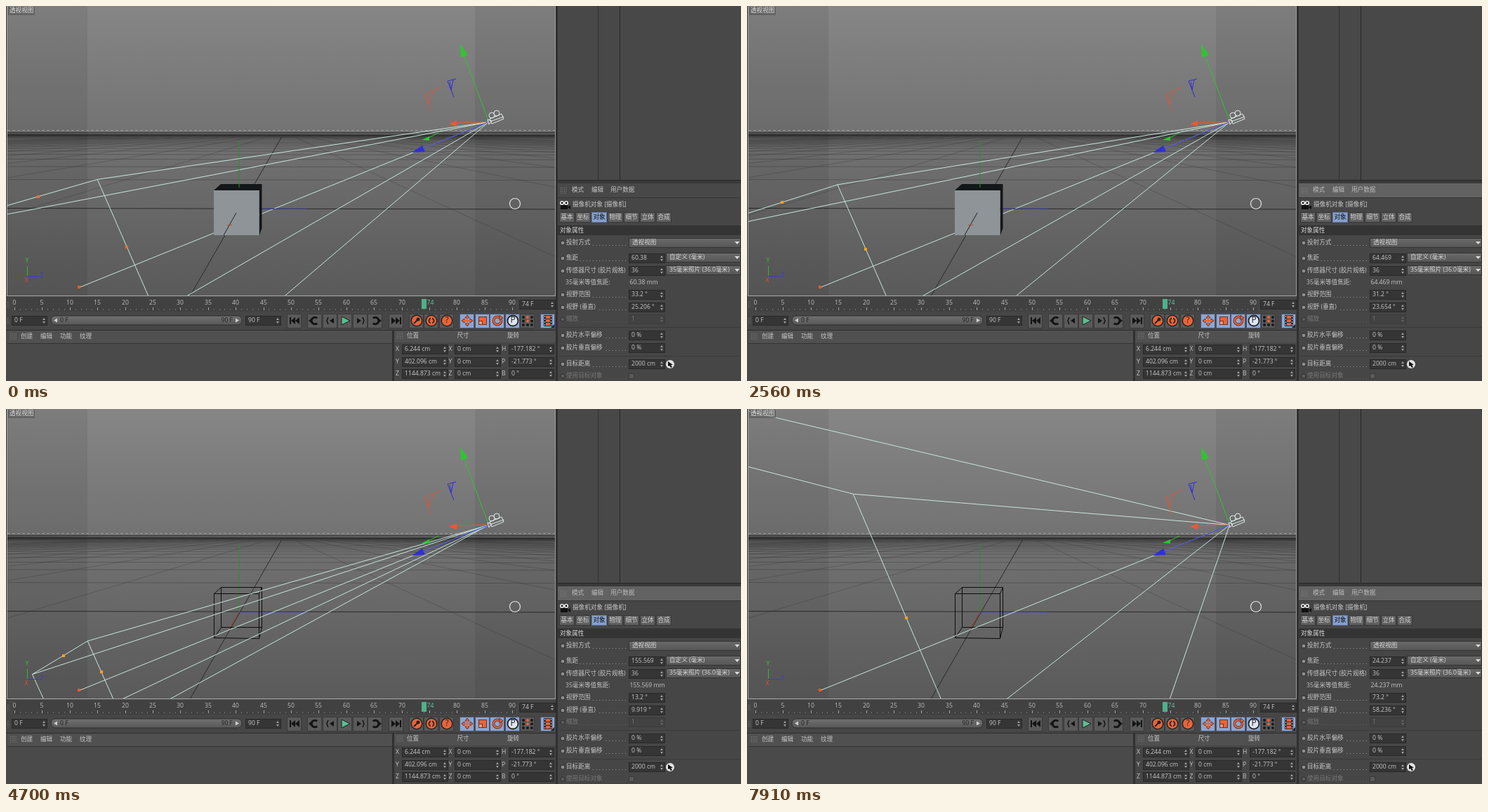
An HTML page with a canvas for the animation above (8 s loop, 1047x535 px).

```html
<!DOCTYPE html>
<html lang="zh">
<head>
<meta charset="utf-8">
<style>
html, body { margin: 0; width: 100%; height: 100%; overflow: hidden; background: #464646; }
canvas { display: block; }
</style>
</head>
<body>
<canvas id="stage" width="1047" height="535"></canvas>
<script>
const LOOP = 8000;
const FONT = '"Open Sans", "Noto Sans CJK SC", "Noto Sans CJK", sans-serif';
const screen2d = document.getElementById('stage').getContext('2d');
let g = screen2d;

// [start ms, value]
const VIEW = [[0, 33.2], [2080, 32.2], [2560, 31.2], [4130, 11.2], [4700, 13.2], [6120, 25.2], [6650, 43.2], [7910, 73.2]];
const LENS = [[0, 33.2], [2080, 32.2], [2560, 31.2], [3560, 11.2], [4700, 13.2], [5760, 25.2], [6370, 43.2], [7670, 73.2]];
const ANGLE = [...LENS.slice(0, 7), [7240, 58.2], LENS[7]];
const CURSOR = [[0, null], [230, [959, 437]], [570, [948, 423]], [790, [932, 417]], [1050, [931, 414]],
  [1280, [931, 410]], [1490, [931, 409]], [1780, [932, 408]], [2080, null]];

const at = (steps, t) => steps.filter(s => s[0] <= t).pop()[1];

function box(x, y, w, h, fill, edge) {
  g.fillStyle = fill;
  g.fillRect(x, y, w, h);
  if (edge) {
    g.strokeStyle = edge;
    g.lineWidth = 1;
    g.strokeRect(x + .5, y + .5, w - 1, h - 1);
  }
}
function trace(p) {
  g.beginPath();
  for (let i = 0; i < p.length; i += 2) g.lineTo(p[i], p[i + 1]);
}
function line(color, p, width = 1) {
  trace(p);
  g.strokeStyle = color;
  g.lineWidth = width;
  g.stroke();
}
function poly(color, p, edge) {
  trace(p);
  g.closePath();
  g.fillStyle = color;
  g.fill();
  if (edge) {
    g.strokeStyle = edge;
    g.lineWidth = 1;
    g.stroke();
  }
}
function ring(x, y, r, color, width = 1, from = 0, to = 7) {
  g.beginPath();
  g.arc(x, y, r, from, to);
  g.strokeStyle = color;
  g.lineWidth = width;
  g.stroke();
}
function disc(x, y, r, color) {
  g.beginPath();
  g.arc(x, y, r, 0, 7);
  g.fillStyle = color;
  g.fill();
}
function text(s, x, y, color = '#c6c6c6', align = 'left', size = 8.6) {
  g.font = size + 'px ' + FONT;
  g.textBaseline = 'middle';
  g.textAlign = align;
  g.fillStyle = color;
  g.fillText(s, x, y);
}
function shade(y0, y1, a, b) {
  const s = g.createLinearGradient(0, y0, 0, y1);
  s.addColorStop(0, a);
  s.addColorStop(1, b);
  return s;
}
function spinner(x, y, color = '#a0a0a0') {
  poly(color, [x - 2, y - 1, x + 2, y - 1, x, y - 4]);
  poly(color, [x - 2, y + 1, x + 2, y + 1, x, y + 4]);
}
function field(x, y, w, s, off) {
  box(x, y - 7, w, 14, off ? '#424242' : '#353535', off ? '#3b3b3b' : '#292929');
  if (s) text(s, x + 4, y, off ? '#777' : '#c6c6c6');
  spinner(x + w - 5, y, off ? '#666' : undefined);
}
function dropdown(x, y, s) {
  box(x, y - 7, 1047 - x, 14, shade(y - 7, y + 7, '#6b6b6b', '#555'), '#333');
  text(s, x + 5, y, '#d8d8d8');
  poly('#ddd', [1038, y - 2, 1045, y - 2, 1041.5, y + 2]);
}
function grip(x, y) {
  for (let i = 0; i < 4; i++) for (let j = 0; j < 4; j++) box(x + i * 2.5, y + j * 2.5, 1, 1, '#858585');
}

function floor() {
  box(0, 0, 784, 414, '#333');
  box(2, 0, 780, 413, shade(0, 413, '#868686', '#5a5a5a'));
  g.save();
  g.beginPath();
  g.rect(2, 0, 780, 413);
  g.clip();
  for (let n = 1; n < 50; n++) {
    const y = 180 + 109 / (1 + .6 * n);
    line(`rgba(40,40,40,${n < 12 ? .4 : .25})`, [2, y - .5, 782, y + .5], .8);
  }
  for (let n = -12; n <= 12; n++) {
    const k = (300 * n - 63) / 109;
    if (n) line('rgba(45,45,45,.35)', [396 + k * 8, 188, 396 + k * 233, 413], .8);
  }
  box(2, 180, 780, 8, shade(180, 188, 'rgba(40,40,40,.4)', 'rgba(50,50,50,0)'));
  box(2, 180, 780, 1, '#3a3a3a');
  line('#2b2b2b', [2, 288.5, 782, 290]);
  line('#2b2b2b', [392.5, 187, 262.5, 413]);
  box(2, 0, 114, 413, 'rgba(0,0,0,.07)');
  box(668, 0, 114, 413, 'rgba(0,0,0,.07)');
  g.setLineDash([4, 3]);
  line('#9a9a9a', [2, 177.5, 782, 177.5]);
  g.setLineDash([]);
  g.restore();
}

function transportIcon(i, x) {
  const y = 449, k = '#141414';
  if (i === 0 || i === 6) {
    const d = i ? 1 : -1;
    box(x + 6 * d - 1, y - 5, 2, 10, k);
    for (const o of [5, -1]) poly(k, [x + o * d, y, x + (o - 6) * d, y - 5, x + (o - 6) * d, y + 5]);
  } else if (i === 1 || i === 5) {
    // thick open arc with a pointed tip
    const d = i === 1 ? 1 : -1, mid = i === 1 ? Math.PI : 0;
    ring(x, y, 4.8, k, 3, mid - 2.3, mid + 2.3);
    poly(k, [x - 9 * d, y, x - 4 * d, y - 4, x - 4 * d, y + 4]);
  } else if (i === 2 || i === 4) {
    const d = i === 2 ? -1 : 1;
    poly(k, [x + d, y, x - 5 * d, y - 4, x - 5 * d, y + 4]);
    line(k, [x + 3 * d, y - 5, x + 5 * d, y, x + 3 * d, y + 5], 1.5);
  } else poly('#5fbd91', [x - 5, y - 6, x + 7, y, x - 5, y + 6], '#1d1d1d');
}

function toolIcon(i, x) {
  const y = 449, red = '#e8643a', k = '#222';
  if (i < 3) {
    disc(x, y, 8.5, k);
    disc(x, y, 7, red);
    if (i === 0) { line(k, [x - 4, y + 4, x + 2, y - 2], 2); disc(x + 2, y - 2, 2.5, k); }
    if (i === 1) { ring(x, y, 3.5, k, 1.8); box(x - 1, y - 5, 2, 10, red); }
    if (i === 2) text('?', x, y, k, 'center', 12);
  } else if (i === 3) {
    for (const [a, b] of [[1, 0], [-1, 0], [0, 1], [0, -1]])
      poly(red, [x + a * 8, y + b * 8, x + a * 4 + b * 3, y + b * 4 + a * 3, x + a * 4 - b * 3, y + b * 4 - a * 3], '#6b3425');
    line(red, [x - 5, y, x + 5, y], 2);
    line(red, [x, y - 5, x, y + 5], 2);
  } else if (i === 4) {
    box(x - 6, y - 6, 12, 12, red, '#6b3425');
    box(x - 6, y, 6, 6, '#f09a78', '#6b3425');
  } else if (i === 5) {
    ring(x, y, 5.5, '#6b3425', 3.8);
    ring(x, y, 5.5, red, 2);
    poly(red, [x + 3, y - 8, x + 8, y - 4, x + 3, y - 1], '#6b3425');
  } else if (i === 6) {
    disc(x, y, 7.5, '#dfe6f1');
    ring(x, y, 7.5, k, 1.8);
    text('P', x, y, k, 'center', 12);
  } else if (i === 7) {
    for (let n = 0; n < 9; n++) disc(x - 6 + n % 3 * 6, y - 5 + (n / 3 | 0) * 5.5, 2, n === 4 || n === 1 ? red : '#191919');
  } else {
    box(x - 6, y - 8, 12, 16, '#2a2a2a');
    for (let n = 0; n < 3; n++) box(x - 3, y - 7 + n * 5, 6, 4, red);
    for (let n = 0; n < 4; n++) { box(x - 5, y - 7 + n * 4, 1, 2, '#ccc'); box(x + 4, y - 7 + n * 4, 1, 2, '#ccc'); }
    poly(k, [x + 9, y + 10, x + 9, y + 5, x + 4, y + 10]);
  }
}

function timeline() {
  box(0, 414, 784, 48, '#464646');
  box(8, 416, 719, 20, '#414141');
  grip(2, 422);
  grip(2, 445);
  box(5, 416, 6, 45, '#464646');
  for (let n = 0; n <= 90; n++) {
    const x = Math.round(12 + n * 7.88), big = n % 5 === 0;
    box(x, big ? 430 : 432, 1, big ? 4 : 2, big ? '#a5a5a5' : '#707070');
    if (big && n !== 75) text(n, x, 423.5, '#bdbdbd', 'center');
  }
  box(592, 418, 7, 14, '#4fb08b');
  text('74', 599.5, 423.5, '#62c49c');
  field(731, 426, 52, '74 F');
  field(8, 449, 51, '0 F');
  field(341, 449, 51, '90 F');
  g.beginPath();
  g.roundRect(64, 442, 272, 13, 6);
  g.fillStyle = shade(442, 455, '#707070', '#585858');
  g.fill();
  g.strokeStyle = '#2d2d2d';
  g.stroke();
  poly('#d0d0d0', [68, 448.5, 73, 445.5, 73, 451.5]);
  poly('#d0d0d0', [332, 448.5, 327, 445.5, 327, 451.5]);
  text('0 F', 77, 448.5, '#222');
  text('90 F', 323, 448.5, '#222', 'right');
  [411, 440, 462, 483, 505, 526, 556].forEach((x, i) => {
    box(x - 11, 439, 21, 21, '#5a5a5a', '#3a3a3a');
    transportIcon(i, x);
  });
  [585, 606, 628, 657, 679, 700, 722, 743, 772].forEach((x, i) => {
    const on = i > 2 && i !== 7;
    box(x - 11, 439, 21, 21, on ? '#8ca6d4' : '#5a5a5a', on ? '#4b5568' : '#3a3a3a');
    toolIcon(i, x);
  });
}

function lowerPanels() {
  box(0, 462, 551, 73, '#4a4a4a');
  box(0, 462, 784, 1, '#2c2c2c');
  box(2, 463, 548, 18, '#505050');
  box(2, 481, 548, 1, '#333');
  grip(6, 467);
  ['创建', '编辑', '功能', '纹理'].forEach((s, i) => text(s, 21 + i * 28, 472));
  box(550, 462, 3, 73, '#303030');
  box(553, 463, 231, 72, '#464646');
  box(553, 463, 231, 17, '#505050');
  grip(557, 466);
  ['位置', '尺寸', '旋转'].forEach((s, i) => text(s, 571 + i * 71.5, 471));
  [['X', '6.244 cm', 'H', '-177.182 °'], ['Y', '402.096 cm', 'P', '-21.773 °'], ['Z', '1144.873 cm', 'B', '0 °']]
    .forEach(([axis, pos, turn, deg], i) => {
      const y = 490.5 + i * 17.7 | 0;
      text(axis, 555, y);
      field(564, y, 66, pos);
      text(axis, 630.5, y);
      field(639, y, 66, '0 cm');
      text(turn, 706, y);
      field(716, y, 65, deg);
    });
}

function row(s, y, off) {
  const c = off ? '#777' : '#c6c6c6';
  disc(793, y, 3, off ? '#5c5c5c' : '#8d8d8d');
  ring(793, y, 3, '#2f2f2f');
  text(s, 798, y, c);
  const end = 799 + g.measureText(s).width;
  for (let x = 882; x > end; x -= 4.6) box(x, y + 3, 1, 1, off ? '#666' : '#999');
}

function inspector() {
  box(784, 0, 263, 535, '#464646');
  box(782, 0, 1, 414, '#9b9b9b');
  box(783, 0, 3, 535, '#303030');
  box(786, 0, 261, 248, '#484848');
  box(843, 0, 1, 248, '#303030');
  box(874, 0, 1, 248, '#262626');
  box(786, 248, 261, 1, '#272727');
  box(786, 249, 261, 4, '#393939');
  // small film camera
  for (const x of [792, 798]) { disc(x, 281, 3, '#eee'); disc(x, 281, 1.4, '#111'); }
  box(790, 284, 10, 6, '#111');
  poly('#111', [800, 287, 804, 284, 804, 290]);
  text('摄像机对象 [摄像机]', 807, 283.5);
  ['基本', '坐标', '对象', '物理', '细节', '立体', '合成'].forEach((s, i) => {
    const x = 788 + i * 23.1 | 0, on = i === 2;
    box(x, 294, 22, 15, on ? '#87a1cf' : '#606060', on ? '#607498' : '#383838');
    text(s, x + 11, 301.5, on ? '#111' : '#d0d0d0', 'center');
  });
  box(786, 313, 261, 14, '#343434');
  text('对象属性', 789, 320.5, '#d8d8d8');
  row('投射方式', 338);
  dropdown(887, 338, '透视视图');
  row('焦距', 360);
  field(887, 360, 52);
  dropdown(940, 359, '自定义 (毫米)');
  row('传感器尺寸 (胶片规格)', 378);
  field(887, 378, 52, '36');
  dropdown(940, 377, '35毫米照片 (36.0毫米)');
  text('35毫米等值焦距:', 797, 395);
  row('视野范围', 412);
  field(887, 412, 52);
  row('视野 (垂直)', 430);
  field(887, 430, 52);
  row('缩放', 447, true);
  field(887, 447, 52, '1', true);
  box(788, 458, 259, 1, '#3b3b3b');
  row('胶片水平偏移', 470);
  field(887, 470, 52, '0 %');
  row('胶片垂直偏移', 488);
  field(887, 488, 52, '0 %');
  box(788, 499, 259, 1, '#3b3b3b');
  row('目标距离', 511);
  field(887, 511, 52, '2000 cm');
  disc(946, 511, 6, '#e4e4e4');
  poly('#111', [943, 507, 950, 512, 947, 512, 949, 515, 947, 516, 945, 513, 943, 514]);
  row('使用目标对象', 528, true);
  box(887, 524, 8, 8, '#5a5a5a', '#3a3a3a');
}

const APEX = [687.5, 165.5];
const AIM = [104.5, 401.5];
const RAY = '#c9e6da';

// Point on the camera's target plane; t is the tangent of the half angle.
function corner(t, a, b) {
  const d = 1 + t * (1.155 * a - .05 * b);
  return [AIM[0] + t * (306.5 * a - 192 * b) / d, AIM[1] - t * (258 * a + 429 * b) / d];
}

function cube(solid) {
  if (solid) {
    poly('#14171a', [296, 263, 306, 254, 364.5, 254, 364.5, 317, 361, 327, 361, 263]);
    poly('#8e9497', [296, 263, 360.5, 263, 360.5, 327, 296, 327]);
    line('#222', [328, 295, 310, 327]);
    line('#a5523c', [315, 312.5, 322, 312.5]);
    line('#2a8f33', [332, 192, 332, 259]);
    line('#3232a8', [365, 289.5, 428, 289.5]);
    return;
  }
  line('#a83c30', [332, 289, 318, 313]);
  line('#2a8f33', [332, 192, 332, 289]);
  line('#3232a8', [332, 289.5, 428, 289.5]);
  line('#0c0c0c', [296.5, 263.5, 360.5, 263.5, 360.5, 327.5, 296.5, 326.5, 296.5, 263.5, 306.5, 254.5, 364.5, 254.5, 360.5, 263.5]);
  line('#0c0c0c', [306.5, 254.5, 306.5, 311.5, 364.5, 311.5, 364.5, 254.5]);
  line('#0c0c0c', [296.5, 326.5, 306.5, 311.5]);
  line('#0c0c0c', [360.5, 327.5, 364.5, 311.5]);
}

function gizmos() {
  const green = '#2fc52f', red = '#e85a32', blue = '#2f2fd8';
  line(green, [687, 163, 652, 70]);
  poly(green, [647, 54, 658, 70, 648, 73]);
  line(red, [687, 165, 640, 167]);
  poly(red, [631, 168, 642, 163, 642, 172]);
  line(blue, [...APEX, 594, 203.5]);
  poly(blue, [578, 209, 593, 199, 597, 208]);
  line(green, [616, 181, 602, 188]);
  poly(green, [592, 191, 603, 186, 603, 192]);
  line(blue, [641, 104, 629, 107, 638, 130]);
  line(blue, [637, 105, 634, 120, 632, 108]);
  line('#d05a42', [621, 115, 596, 126, 605, 150]);
  line('#d05a42', [609, 121, 602, 140, 599, 126]);
  ring(692, 156, 4, '#e0eee8');
  ring(699, 153, 4, '#e0eee8');
  line('#e0eee8', [689, 161, 706, 154, 709, 161, 692, 168, 689, 161]);
  line('#e0eee8', [692, 164, 686, 162, 688, 169, 692, 164, 709, 158]);
  ring(725, 282, 7.5, '#e4e4e4', 1.2);
}

function viewport(t) {
  const k = Math.tan(at(VIEW, t) * Math.PI / 360);
  const [tr, tl, bl, br] = [[1, 1], [-1, 1], [-1, -1], [1, -1]].map(([a, b]) => corner(k, a, b));
  const solid = t < 4700;
  g.save();
  g.beginPath();
  g.rect(2, 0, 780, 413);
  g.clip();
  if (!solid) cube(false);
  for (const p of [tl, bl, br, AIM]) line(RAY, [...APEX, ...p]);
  line(RAY, [...tr, ...tl, ...bl, ...br, ...tr]);
  if (solid) cube(true);
  line(RAY, [...APEX, ...tr]);
  const dot = ([x, y], c) => box(Math.round(x) - 2, Math.round(y) - 2, 4, 4, c);
  const side = t < 2080 ? '#ef6a3a' : '#f5a21f';
  dot(corner(k, 0, 1), side);
  dot(corner(k, 1, 0), side);
  dot([104, 401], '#f0582c');
  gizmos();
  line('#32b832', [30.5, 371, 30.5, 385]);
  line('#3a3ac8', [30, 385.5, 47, 385.5]);
  text('Y', 30, 364, '#32c832', 'center');
  text('X', 29, 392, '#e05030', 'center');
  text('Z', 51, 385, '#3a3ad8', 'center');
  g.restore();
  box(3, 1, 38, 12, 'rgba(80,80,80,.55)');
  text('透视视图', 5, 7, '#e2e2e2');
  box(1, 0, 1, 414, '#a8a8a8');
  box(1, 413, 782, 1, '#a8a8a8');
}

function header(lit) {
  box(786, 253, 261, 20, lit ? '#626262' : '#484848');
  box(786, 273, 261, 1, '#363636');
  grip(790, 259);
  [['模式', 806], ['编辑', 834], ['用户数据', 861]].forEach(([s, x]) => text(s, x, 263, lit ? '#bcbcbc' : '#c6c6c6'));
}

function values(t) {
  const k = Math.tan(at(LENS, t) * Math.PI / 360);
  const focal = +(18 / k).toFixed(3);
  const tall = +(Math.atan(.75 * k) * 360 / Math.PI).toFixed(3);
  const edit = t >= 1490 && t < 2080, picked = edit && t >= 1780;
  text(focal, 891, 360);
  text(focal + ' mm', 888.5, 395);
  text(tall + ' °', 891, 430);
  if (edit) box(888, 405, 50, 14, '#202020');
  if (picked) {
    box(890, 406, 22, 12, '#a9adb2');
    box(912, 406, 1, 12, '#f0a020');
  }
  text(at(ANGLE, t) + ' °', 891, 412, picked ? '#222' : '#c6c6c6');
}

function pointer([x, y]) {
  const p = [0, 0, 0, 13, 3, 10, 5, 15, 7, 14, 5, 9, 9, 9].map((v, i) => v + (i % 2 ? y : x) + .3);
  poly('#fff', p, '#111');
}

function makeBase() {
  const c = document.createElement('canvas');
  c.width = 1047;
  c.height = 535;
  g = c.getContext('2d');
  floor();
  timeline();
  lowerPanels();
  inspector();
  g = screen2d;
  return c;
}

const base = makeBase();
const start = performance.now();
function draw() {
  const t = (performance.now() - start) % LOOP;
  g.drawImage(base, 0, 0);
  viewport(t);
  header(t >= 1490);
  values(t);
  const p = at(CURSOR, t);
  if (p) pointer(p);
  requestAnimationFrame(draw);
}
draw();
</script>
</body>
</html>
```
